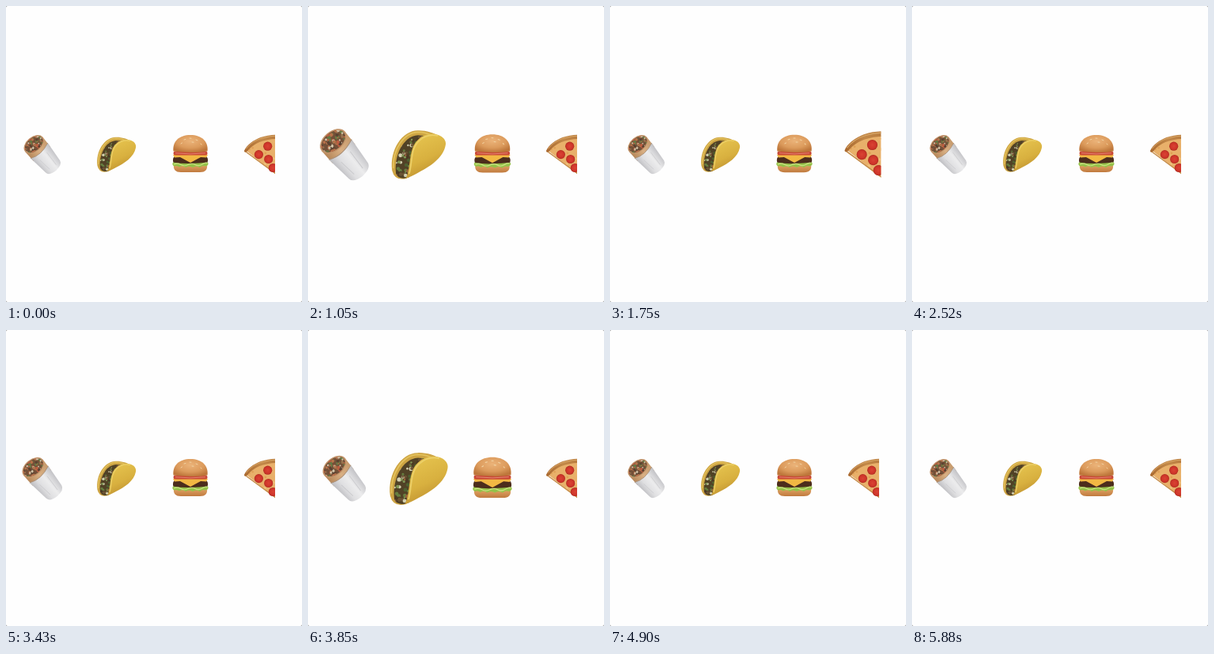
Recreate the animation shown at these times as an HTML page. Size 374 px wide and 374 px high, loop 5.95 s.

```html
<!DOCTYPE html>
<html lang="en">
<head>
<meta charset="utf-8">
<title>Food wave</title>
<style>
  html, body { margin: 0; width: 100%; height: 100%; overflow: hidden; background: #8a8a8a; }
  svg { display: block; width: 100vw; height: 100vh; background: #fefefe; border-radius: 2px; }
</style>
</head>
<body>
<svg viewBox="0 0 374 374">
  <defs>
    <linearGradient id="foil">
      <stop offset="0" stop-color="#bcbcc0"/><stop offset=".3" stop-color="#dfdfe1"/>
      <stop offset=".6" stop-color="#ececed"/><stop offset="1" stop-color="#c0c0c4"/>
    </linearGradient>
    <linearGradient id="wrap">
      <stop offset="0" stop-color="#b58658"/><stop offset=".5" stop-color="#d9b084"/><stop offset="1" stop-color="#c69a6c"/>
    </linearGradient>
    <linearGradient id="shell" x1=".3" y1="0" x2=".7" y2="1">
      <stop offset="0" stop-color="#e6c44f"/><stop offset=".55" stop-color="#d8b03f"/><stop offset="1" stop-color="#b98a2c"/>
    </linearGradient>
    <radialGradient id="bun" cx=".5" cy=".35" r=".65">
      <stop offset="0" stop-color="#ebb379"/><stop offset=".6" stop-color="#dc9b5c"/><stop offset="1" stop-color="#bd763a"/>
    </radialGradient>
    <linearGradient id="heel" x2="0" y2="1">
      <stop offset="0" stop-color="#e2a768"/><stop offset="1" stop-color="#c07a3e"/>
    </linearGradient>
    <linearGradient id="crust" x2="1" y2="0">
      <stop offset="0" stop-color="#a9682f"/><stop offset=".5" stop-color="#c28848"/><stop offset="1" stop-color="#b77a3d"/>
    </linearGradient>
    <radialGradient id="pepperoni">
      <stop offset="0" stop-color="#da4334"/><stop offset=".75" stop-color="#cd3429"/><stop offset="1" stop-color="#ad2b20"/>
    </radialGradient>
    <clipPath id="glyphEdge"><path d="M-40-40H13.5V40H-40Z"/></clipPath>
    <clipPath id="slice"><path d="M-23-5Q-11-18 18-20L15 25Z"/></clipPath>
    <clipPath id="pocket"><path d="M-20 18C-22 2-14-16 0-17L10-16L-8 21Q-17 24-20 18Z"/></clipPath>
    <clipPath id="mouth"><ellipse cy="-16" rx="13" ry="8.2"/></clipPath>
  </defs>

  <g class="food">
    <g transform="rotate(-40)">
      <path d="M-14.500-16L-14 0H14L14.500-16Z" fill="url(#wrap)"/>
      <path d="M-14.500-5Q-2 1 14.500-6L12 21Q11 27 0 27.500Q-11 27-11.500 21Z" fill="url(#foil)"/>
      <path d="M-14.500-5Q-2 1 14.500-6" fill="none" stroke="#a98f78" stroke-width=".8"/>
      <path d="M-7 4L-5 21M6 2L5 22" fill="none" stroke="#cbcbce" stroke-width=".8"/>
      <ellipse cy="-16" rx="14.500" ry="9.300" fill="#c2946a"/>
      <ellipse cy="-16" rx="13" ry="8.200" fill="#735038"/>
      <g id="burritoFill" clip-path="url(#mouth)"></g>
    </g>
  </g>

  <g class="food">
    <path d="M-23.500 15C-26-4-14-21.500 0-21.300C7-21.500 15-19 19-16L-10 22Q-21 25-23.500 15Z" fill="#cda443"/>
    <path d="M-22.500 13C-23-4-13-19.500 0-19.800Q7-19.500 11-17.500" fill="none" stroke="#e3c15c" stroke-width="1.300"/>
    <path d="M-20 18C-22 2-14-16 0-17L10-16L-8 21Q-17 24-20 18Z" fill="#514226"/>
    <g id="tacoFill" clip-path="url(#pocket)"></g>
    <path d="M-11 22C-6 12-9-5 0-13C6-18.500 13-19 18-17.500C23-16 26-12 25-8C23 4 10 12 0 17Q-7 21-11 22Z" fill="url(#shell)"/>
    <path d="M-8 18C-5 8-7-5 1-12C6-16.500 12-18 18-16.500" fill="none" stroke="#ecd069" stroke-width="1.200"/>
  </g>

  <g class="food">
    <path d="M-21 13H21Q22.500 23 12 23H-12Q-22.500 23-21 13Z" fill="url(#heel)"/>
    <rect x="-22" y="2.500" width="44" height="10.500" rx="4.500" fill="#4c2d1c"/>
    <path d="M-22 10.500Q-11 12.500 0 12T22 10.500Q24 14 19 15.500Q15 14 12 17Q7 14 3 17Q-2 14-6 17Q-10 14-14 16.500Q-17 14-20 15.500Q-24 14-22 10.500Z" fill="#94c249"/>
    <path d="M-21 13Q-16 11-12 13.500T-3 13.500T6 13.500T15 13T21 12" fill="none" stroke="#cbe283" stroke-width="1.200"/>
    <path d="M-22 1H22L20 4.500L13 4L0 11L-13 4L-20 4.500Z" fill="#f2b843"/>
    <rect x="-21.500" y="-3.500" width="43" height="5" rx="2.500" fill="#c94836"/>
    <path d="M-19-1.200Q0 1 19-1.200" fill="none" stroke="#e58b77" stroke-width=".9"/>
    <path d="M-21.500-3.500C-23-16-14-24 0-24S23-16 21.500-3.500Q11-1.500 0-2T-21.500-3.500Z" fill="url(#bun)"/>
    <path d="M-8-18l2-.6M-1-20l2 .2M7-18l2 .8M-12-13l1.500-1M2-15l2 .2M13-13l1 1" stroke="#f2d3a2" stroke-width="1" stroke-linecap="round"/>
  </g>

  <g class="food">
    <g clip-path="url(#glyphEdge)">
      <path d="M-24-5Q-12-18 18-20L15 26Z" fill="#e8b06a"/>
      <g id="cheese" clip-path="url(#slice)"></g>
      <path d="M-25-4L15 25.500" stroke="#c48a45" stroke-width="1.400"/>
      <path d="M-25.500-4C-23-11-14-17.500-5-21C3-23.700 10-24.300 18-24.500V-19C4-19-6-15.500-12-12Q-19-7.500-21.500-3.500Q-25.500-1-25.500-4Z" fill="url(#crust)"/>
      <path d="M-23-6.500C-18-13.500-11-17.500-3-20Q7-23 18-23" fill="none" stroke="#d9a868" stroke-width="1"/>
      <g id="slices" fill="url(#pepperoni)"></g>
    </g>
  </g>
</svg>
<script>
const LOOP = 5950, STEP = 70, STAGGER = 210, PEAKS = [925, 3655];
const CENTERS = [45.5, 139, 233, 326.5], MIDDLE = 187;
const byId = id => document.getElementById(id);

let seed = 7;
const random = () => (seed = seed * 16807 % 2147483647) / 2147483647;
const between = (low, high) => low + (high - low) * random();

function dot(parent, x, y, r, fill) {
  const circle = document.createElementNS("http://www.w3.org/2000/svg", "circle");
  const attributes = { cx: x, cy: y, r };
  if (fill) attributes.fill = fill;
  for (const key in attributes) circle.setAttribute(key, attributes[key]);
  parent.append(circle);
}

function scatter(id, count, [left, top, right, bottom], colors) {
  for (let i = 0; i < count; i++)
    dot(byId(id), between(left, right), between(top, bottom), between(0.8, 1.8), colors[i % colors.length]);
}

scatter("burritoFill", 70, [-13, -24, 13, -8], ["#667a45", "#b9724a", "#5b4231", "#bd5c40", "#97744f", "#d3c4a8"]);
scatter("tacoFill", 110, [-23, -17, 6, 23], ["#667f40", "#4a3924", "#819957", "#6b5434", "#d3cfae", "#4d6231", "#93623b"]);
scatter("cheese", 40, [-22, -18, 14, 24], ["#f0c27c", "#e0a055", "#eab66f"]);
for (const [x, y] of [[-7.1, 0.6], [4.2, -9.8], [5.2, 6.5], [10.8, 17.5]]) dot(byId("slices"), x, y, 5.6);

// Bell-shaped swell, slightly slower on the way down.
function swell(offset) {
  const width = offset < 0 ? 122 : 135;
  return 0.5 * Math.exp(-((offset / width) ** 2) / 2);
}

const foods = [...document.querySelectorAll(".food")];

function draw(now) {
  const time = Math.floor((now % LOOP) / STEP) * STEP;
  foods.forEach((food, i) => {
    const growth = PEAKS.reduce((sum, peak) => sum + swell(time - peak - i * STAGGER), 0);
    const scale = growth < 0.004 ? 1 : 1 + growth;
    food.setAttribute("transform", `translate(${CENTERS[i]} ${MIDDLE}) scale(${scale})`);
  });
}

const start = performance.now();
function tick() {
  draw(performance.now() - start);
  requestAnimationFrame(tick);
}
tick();
</script>
</body>
</html>
```
